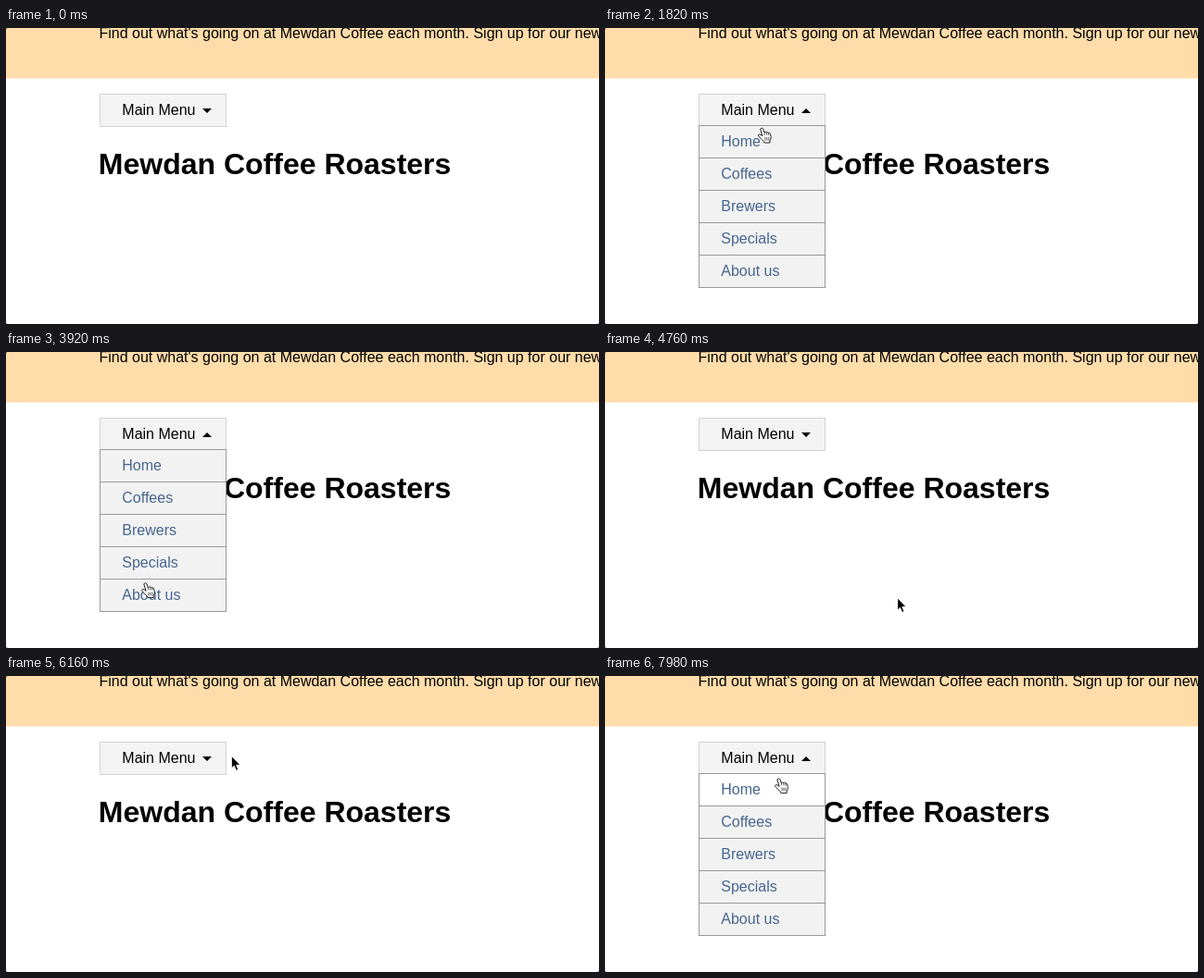
These frames come from a looping animation (640 px wide and 320 px high, 8000 ms). An HTML page:

```html
<!DOCTYPE html>
<html lang="en">
<head>
<meta charset="utf-8">
<title>Dropdown menu</title>
<style>
  html, body { margin: 0; width: 100%; height: 100%; overflow: hidden; background: #fff; }
  svg { display: block; width: 640px; height: 320px; }
  text { font: 16px Helvetica, Arial, "Liberation Sans", sans-serif; fill: #000; }
  .title { font-size: 32px; font-weight: bold; }
  .item rect { fill: #f2f2f2; stroke: #999; }
  .item.hover rect { fill: #fff; }
  .item text { fill: #46658f; }
  .cursor { stroke-linejoin: round; stroke-linecap: round; }
</style>
</head>
<body>
<svg viewBox="0 0 640 320">
  <rect width="640" height="320" fill="#fff"/>
  <rect width="640" height="54.5" fill="#fda"/>
  <text x="100.5" y="11">Find out what's going on at Mewdan Coffee each month. Sign up for our newsletter</text>
  <text class="title" x="99.8" y="158">Mewdan Coffee Roasters</text>

  <rect x="101.5" y="71.5" width="136" height="35" fill="#f3f3f3" stroke="#d3d3d3"/>
  <text x="125.3" y="94">Main Menu</text>
  <path id="caret"/>
  <g id="menu"></g>

  <path d="M0 0H2.5Q0 0 0 2.5ZM0 320V317.5Q0 320 2.5 320ZM640 320V317.5Q640 320 637.5 320Z" fill="#777"/>

  <g id="arrow" class="cursor">
    <path d="M0 0V13.2L3 10.5L5.1 15.6L7.5 14.6L5.4 9.6H9.4Z" fill="#000" stroke="#fff"/>
  </g>
  <g id="hand" class="cursor" stroke="#222">
    <path transform="translate(-4 0)" fill="#fff" d="M3 1.5Q4.4-.2 5.8 1.5L7.2 5.4Q8.3 4.4 9.4 5.4Q10.6 4.6 11.6 5.9Q13 5.4 13.6 7L14.4 10.5Q14.4 13 13.2 14.2V16.6H7Q6.5 14.8 4.2 12.9L1 9.6Q0 8 1.6 7.6Q3 7.6 4.8 9Z"/>
    <path transform="translate(-4 0)" fill="none" stroke-width=".7" d="M7.2 5.4L7.8 8M9.4 5.4L10 8M11.6 5.9L12 8.2M8 11V14M10 11V14M12 11V14"/>
  </g>
</svg>
<script>
const LOOP = 8000, STEP = 70;
const LEFT = 101, RIGHT = 238, TOP = 71, MENU_TOP = 105, ROW = 35;
const labels = ['Home', 'Coffees', 'Brewers', 'Specials', 'About us'];
const MENU_BOTTOM = MENU_TOP + labels.length * ROW;

const $ = id => document.getElementById(id);
const show = (el, on) => el.setAttribute('visibility', on ? 'visible' : 'hidden');
const ease = k => k * k * k * (k * (6 * k - 15) + 10);
const stop = (t, x, y) => ({ t, x, y });

// the pointer sweeps evenly up and down the open menu
const sweep = Array.from({ length: 6 }, (_, i) => stop(1935 + i * 397, 150, i % 2 ? 249 : 125));
const stops = [
  stop(70, 630, 296), stop(770, 402, 225), stop(1050, 250.5, 160), stop(1680, 196, 82),
  ...sweep,
  stop(4760, 315.5, 266), stop(5390, 200, 95), stop(5670, 190, 150), stop(6160, 243.3, 86.7),
  stop(6650, 296, 130), stop(7000, 210, 92), stop(7420, 190, 200), stop(LOOP - 20, 187, 110)
];

function pointerAt(t) {
  const i = stops.findIndex(s => s.t > t);
  if (i === 0) return null;
  if (i < 0) return stops[stops.length - 1];
  const a = stops[i - 1], b = stops[i];
  const k = ease((t - a.t) / (b.t - a.t));
  return { x: a.x + (b.x - a.x) * k, y: a.y + (b.y - a.y) * k };
}

// hovering the button opens the menu; leaving button and menu closes it
function isOpenAt(time) {
  let open = false;
  for (let t = 0; t <= time; t += STEP) {
    const p = pointerAt(t);
    open = !!p && p.x > LEFT && p.x < RIGHT && p.y > TOP && p.y < (open ? MENU_BOTTOM : MENU_TOP);
  }
  return open;
}

$('menu').innerHTML = labels.map((label, i) => {
  const y = MENU_TOP + i * ROW;
  return `<g class="item"><rect x="101.5" y="${y + .5}" width="136" height="${ROW}"/>
    <text x="125.3" y="${y + 23}">${label}</text></g>`;
}).join('');
const items = [...$('menu').children];

function draw(t) {
  const open = isOpenAt(t), p = pointerAt(t);
  const row = p ? (p.y - MENU_TOP) / ROW : -1;
  const onItem = open && row >= 0;

  show($('menu'), open);
  $('caret').setAttribute('d', open ? 'M212 92H222L217 87Z' : 'M212 87H222L217 92Z');
  // the top few pixels of a row do not highlight it
  items.forEach((el, i) =>
    el.classList.toggle('hover', onItem && i === Math.floor(row) && row - i > .13));

  show($('hand'), p && onItem);
  show($('arrow'), p && !onItem);
  if (p) $(onItem ? 'hand' : 'arrow').setAttribute('transform', `translate(${p.x.toFixed(1)} ${p.y.toFixed(1)})`);
}

const start = performance.now();
function tick() {
  const t = (performance.now() - start) % LOOP;
  draw(Math.floor(t / STEP) * STEP);
  requestAnimationFrame(tick);
}
tick();
</script>
</body>
</html>
```
